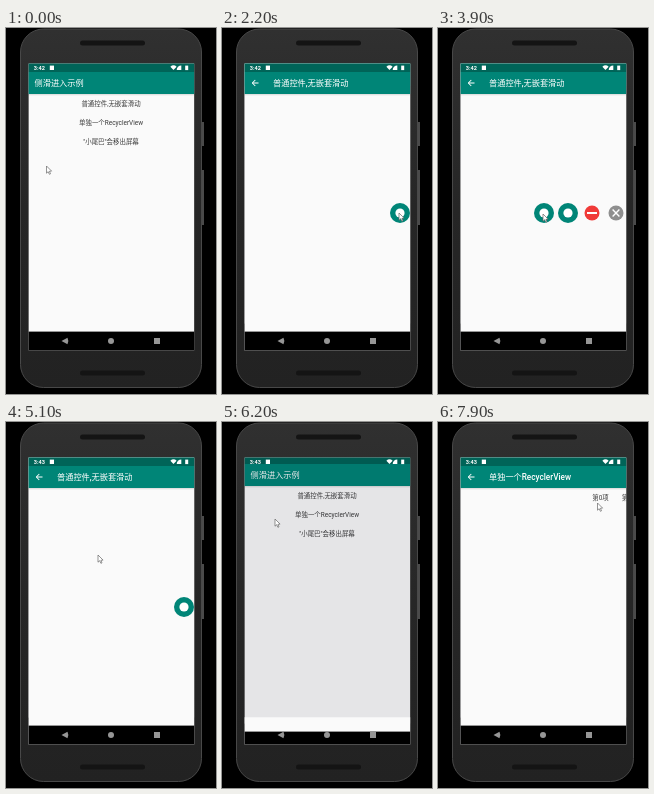
These frames come from a looping animation (210 px wide and 366 px high, 8 s). An HTML page with a canvas:

```html
<!DOCTYPE html>
<html lang="zh-CN">
<head>
<meta charset="utf-8">
<style>
html, body { margin: 0; width: 100%; height: 100%; overflow: hidden; background: #000; }
canvas { display: block; width: 210px; height: 366px; }
</style>
</head>
<body>
<canvas id="stage"></canvas>
<script>
const W = 210, H = 366, LOOP = 8000, STEP = 100;
const MOVE = 600, SWAP = 400;
const OPEN_PLAIN = 1500, CLOSE_PLAIN = 5900, OPEN_LIST = 6700;
const screen = { x: 22.4, y: 35.4, w: 166, h: 287 };
const HEAD = 44, BODY = 66, NAV = 303.6, BOTTOM = screen.y + screen.h;
const MID = 105, ROW = 18.9, SIDE = 178, HANDLE_Y = 185, GAP = 24;
const TEAL = '#008577';
const FONT = 'Roboto, "Noto Sans CJK SC", "Noto Sans CJK", sans-serif';

const canvas = document.getElementById('stage');
const ctx = canvas.getContext('2d');
const dpr = window.devicePixelRatio || 1;
canvas.width = W * dpr;
canvas.height = H * dpr;

const clamp = p => Math.max(0, Math.min(1, p));
const progress = (t, start, span) => clamp((t - start) / span);
const easeOut = p => 1 - Math.pow(1 - p, 1.7);
const rowY = i => 75.5 + ROW * i;

// eased 0..1 that ends at the given time
function arrive(t, end) {
  const p = progress(t, end - MOVE, MOVE);
  return p * p * (3 - 2 * p);
}

const stops = [
  { at: 0, x: 40.5, y: 138 },
  { at: 1000, x: 116.5, y: 80 },
  { at: 2200, x: SIDE - 1, y: HANDLE_Y },
  { at: 3400, x: MID, y: HANDLE_Y + 1 },
  { at: 5100, x: 92, y: 133 },
  { at: 5700, x: 32, y: 53 },
  { at: 6200, x: 53, y: 97 },
  { at: 7300, x: 173, y: 81 },
  { at: 7900, x: 159.5, y: 81 }
];

function pointerAt(t) {
  let { x, y } = stops[0];
  for (const s of stops.slice(1)) {
    const p = arrive(t, s.at);
    x += (s.x - x) * p;
    y += (s.y - y) * p;
  }
  return { x, y };
}

function rect(x, y, w, h, color) {
  ctx.fillStyle = color;
  ctx.fillRect(x, y, w, h);
}

function round(x, y, w, h, r, fill, rim) {
  ctx.beginPath();
  ctx.roundRect(x, y, w, h, r);
  ctx.fillStyle = fill;
  ctx.fill();
  if (!rim) return;
  ctx.strokeStyle = rim;
  ctx.lineWidth = 1;
  ctx.stroke();
}

function disc(x, y, r, color) {
  ctx.fillStyle = color;
  ctx.beginPath();
  ctx.arc(x, y, r, 0, Math.PI * 2);
  ctx.fill();
}

// wedge with its tip at x, y
function wedge(x, y, r, angle, spread, color) {
  ctx.fillStyle = color;
  ctx.beginPath();
  ctx.moveTo(x, y);
  ctx.arc(x, y, r, angle - spread, angle + spread);
  ctx.fill();
}

// bar centred on x, y
function bar(x, y, length, width, angle = 0) {
  ctx.save();
  ctx.translate(x, y);
  ctx.rotate(angle);
  rect(-length / 2, -width / 2, length, width, '#fff');
  ctx.restore();
}

function text(str, x, y, size, color, weight = 400, align = 'left') {
  ctx.font = `${weight} ${size}px ${FONT}`;
  ctx.textAlign = align;
  ctx.fillStyle = color;
  ctx.fillText(str, x, y + size * 0.37);
}

const label = (str, x, y) => text(str, x, y, 6.45, '#3a3a3a', 400, 'center');

function fade(from, to, ...colors) {
  const g = ctx.createLinearGradient(0, from, 0, to);
  colors.forEach((c, i) => g.addColorStop(i / (colors.length - 1), c));
  return g;
}

function phone() {
  rect(0, 0, W, H, '#000');
  rect(196, 94, 2, 24, '#4a4a4a');
  rect(196, 142, 2, 55, '#4a4a4a');
  round(14.5, 1, 181, 358.5, 23, fade(1, 360, '#303030', '#262626', '#222'), '#484848');
  for (const y of [12.5, 342.5]) round(74, y, 65, 5, 2.5, '#141414');
}

function frame(title, back) {
  const { x, y, w } = screen;
  rect(x, y - 10, w, BOTTOM - y + 20, '#fafafa');
  rect(x, y - 10, w, HEAD - y + 10, '#006458');
  rect(x, HEAD, w, BODY - HEAD, TEAL);
  rect(x, BODY, w, 2, fade(BODY, BODY + 2, 'rgba(0,0,0,.14)', 'rgba(0,0,0,0)'));
  rect(x, NAV, w, BOTTOM - NAV + 20, '#000');
  text(title, back ? 51 : 28.5, 55, 8.2, '#fff', 500);
  if (!back) return;
  bar(33.5, 55, 6, 1);
  for (const s of [-1, 1]) bar(31.8, 55 + s * 1.5, 4.2, 1, s * Math.PI / 4);
}

function home(t) {
  frame('侧滑进入示例', false);
  [OPEN_PLAIN, OPEN_LIST].forEach((open, i) => {
    if (Math.abs(t - open) <= 200) rect(33, rowY(i) - 9, 150, 18.5, '#d8dcda');
  });
  ['普通控件,无嵌套滑动', '单独一个RecyclerView', '"小尾巴"会移出屏幕']
    .forEach((s, i) => label(s, MID, rowY(i)));
}

function plain(t) {
  frame('普通控件,无嵌套滑动', true);
  const pull = arrive(t, 3400) - arrive(t, 4700);
  const at = i => SIDE + GAP * (i - 3 * pull);
  for (const i of [0, 1]) {
    disc(at(i), HANDLE_Y, 10, TEAL);
    disc(at(i), HANDLE_Y, 4.6, '#fff');
  }
  disc(at(2), HANDLE_Y, 7.5, '#f03a38');
  bar(at(2), HANDLE_Y, 10, 2);
  disc(at(3), HANDLE_Y, 7.5, '#8f8f8f');
  for (const s of [-1, 1]) bar(at(3), HANDLE_Y, 9.6, 1.4, s * Math.PI / 4);
}

function list(t) {
  frame('单独一个RecyclerView', true);
  const x = 175.5 - 13 * arrive(t, 7900);
  for (let i = 0; i < 3; i++) label(`第${i}项`, x + 29.5 * i, rowY(0));
}

function show(page, t, dy, top = screen.y) {
  ctx.save();
  ctx.beginPath();
  ctx.rect(screen.x, top, screen.w, BOTTOM - top);
  ctx.clip();
  ctx.translate(0, dy);
  page(t);
  ctx.restore();
}

// page slides over home: shift and cover run from 0 (hidden) to 1 (shown)
function overlay(page, t, shift, cover) {
  const { x, y, w, h } = screen;
  show(home, t, -8 * shift);
  rect(x, y, w, h, `rgba(0,0,30,${0.085 * Math.min(1, shift * 4)})`);
  show(page, t, 8 * (1 - shift), BOTTOM - h * cover);
}

function pages(t) {
  if (t < CLOSE_PLAIN) {
    const p = easeOut(progress(t, OPEN_PLAIN, SWAP));
    overlay(plain, t, p, p);
  } else if (t < OPEN_LIST) {
    const p = progress(t, CLOSE_PLAIN, SWAP);
    overlay(plain, t, 1 - p, 1 - easeOut(p));
  } else {
    const p = easeOut(progress(t, OPEN_LIST, SWAP));
    overlay(list, t, p, p);
  }
}

function systemBars(t) {
  const y = 39.6, up = -Math.PI / 2, grey = '#969696';
  text(t < 4500 ? '3:42' : '3:43', 27.7, y, 5.6, '#fff', 700);
  rect(43.8, y - 2, 4.2, 4.4, '#fff');
  wedge(167.5, y + 2.4, 4.6, up, 0.75, '#fff');
  wedge(175.3, y + 2.4, 4.6, up - 0.79, 0.79, '#fff');
  rect(179.2, y - 2, 3, 4.5, '#fff');
  wedge(55.5, 313, 6.8, 0, 0.5, grey);
  disc(MID, 313, 3, grey);
  rect(148, 310, 6, 6, grey);
}

function cursor({ x, y }) {
  const arrow = new Path2D('M0 0V7.2L1.7 5.7L2.9 8.3L4 7.8L2.9 5.3L5.1 5.1Z');
  ctx.save();
  ctx.translate(x, y);
  ctx.fillStyle = '#fff';
  ctx.fill(arrow);
  ctx.strokeStyle = '#666';
  ctx.lineWidth = 0.7;
  ctx.stroke(arrow);
  ctx.restore();
}

function draw(t) {
  ctx.setTransform(dpr, 0, 0, dpr, 0, 0);
  phone();
  pages(t);
  systemBars(t);
  cursor(pointerAt(t));
}

const start = performance.now();
function tick() {
  const t = (performance.now() - start) % LOOP;
  draw(Math.floor(t / STEP) * STEP);
  requestAnimationFrame(tick);
}
tick();
</script>
</body>
</html>
```
